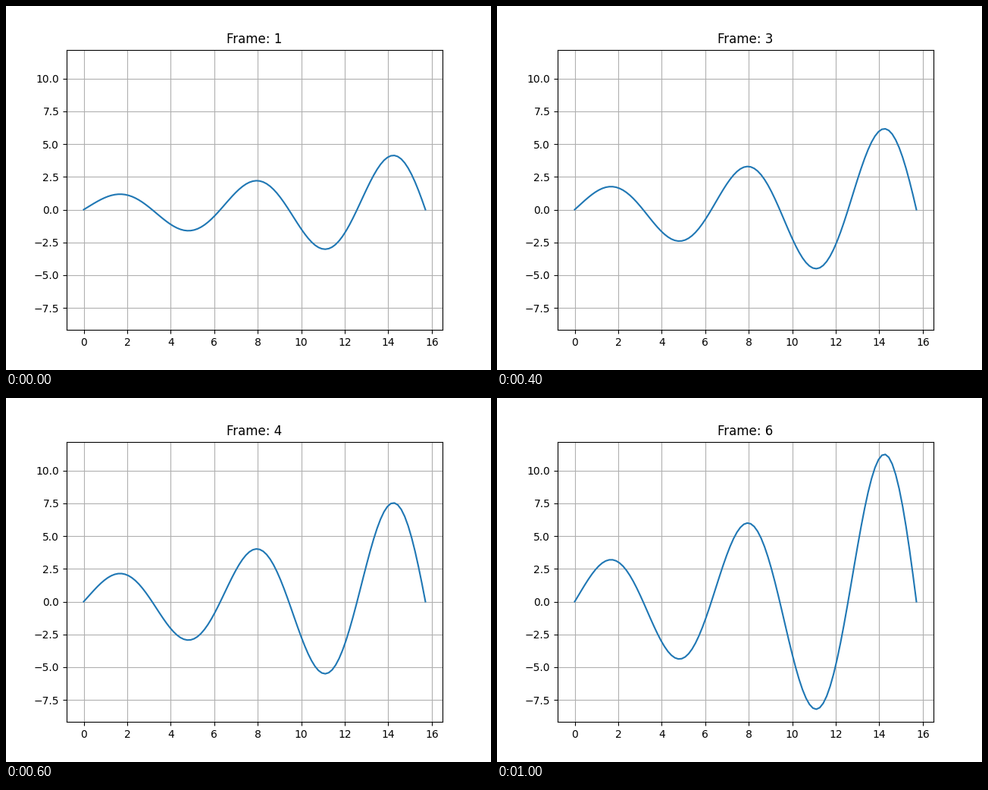
A matplotlib script for the animation above (1.2 s loop, 640 px wide and 480 px high).

```python
import numpy as np
import matplotlib.pyplot as plt
from matplotlib.animation import FuncAnimation

FRAMES = 6
INTERVAL = 200  # ms

x = np.linspace(0, 5 * np.pi, 100)
growth = np.linspace(0, 1, FRAMES)


def wave(index):
    return np.exp(growth[index] + 0.1 * x) * np.sin(x)


fig, ax = plt.subplots(figsize=(6.4, 4.8), dpi=100)

# The tallest wave fixes the axis limits for the whole loop.
line, = ax.plot(x, wave(FRAMES - 1))
ax.set_xlim(ax.get_xlim())
ax.set_ylim(ax.get_ylim())
ax.grid(True)
title = ax.set_title("Frame: 1")


def update(index):
    line.set_ydata(wave(index))
    title.set_text(f"Frame: {index + 1}")
    return line, title


anim = FuncAnimation(fig, update, frames=FRAMES, interval=INTERVAL,
                     init_func=lambda: update(0), repeat=True, repeat_delay=0)
plt.show()
```
